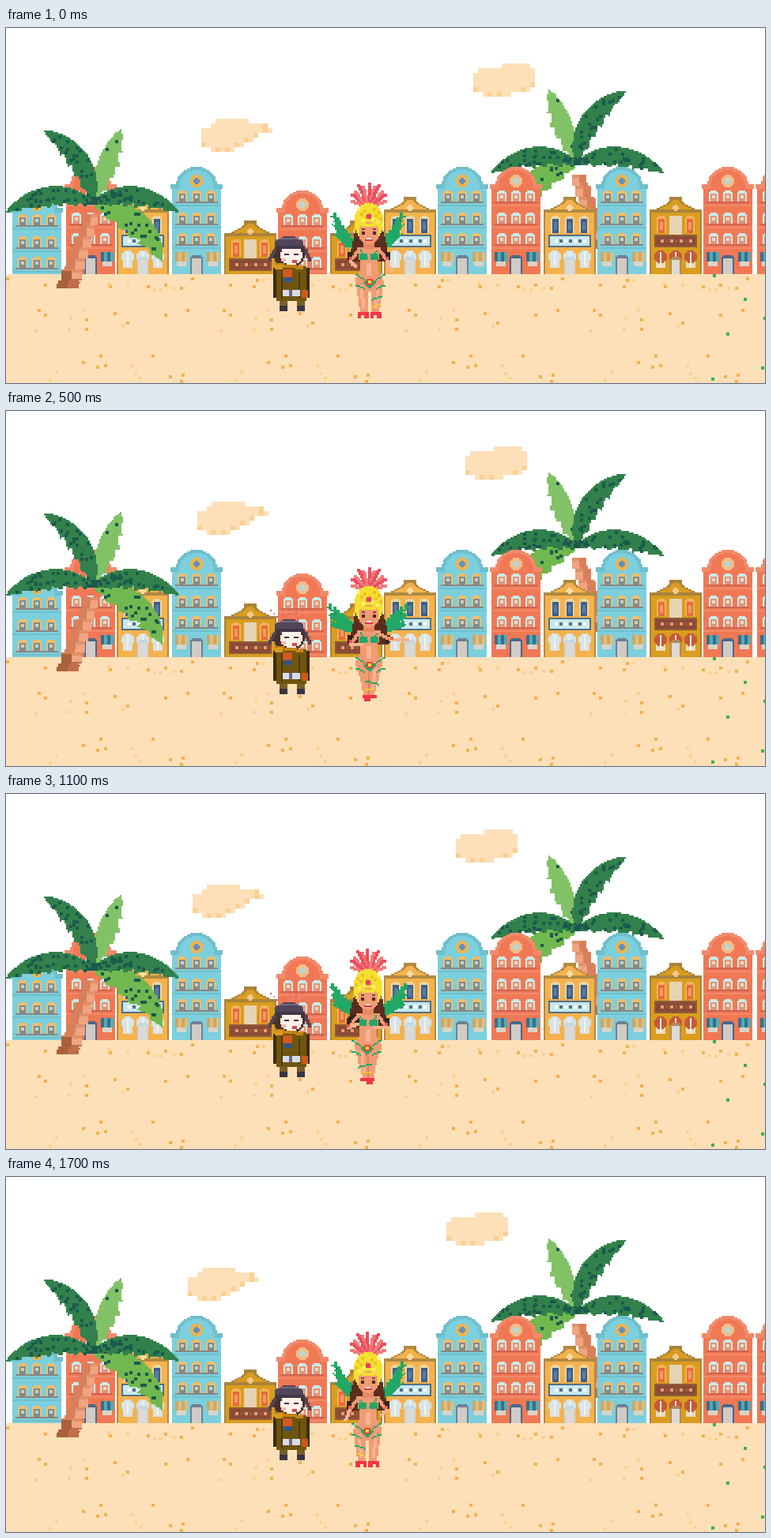
An HTML page with a canvas that plays this animation: 960 px wide and 450 px high, repeating every 1.8 s.

```html
<!DOCTYPE html>
<html lang="en">
<head>
<meta charset="utf-8">
<title>Carnival street</title>
<style>
html, body { margin: 0; width: 100%; height: 100%; overflow: hidden; background: #fff; }
canvas { display: block; }
</style>
</head>
<body>
<canvas id="stage" width="960" height="450"></canvas>
<script>
const stage = document.getElementById('stage').getContext('2d');
const backdrop = document.createElement('canvas');
backdrop.width = 960;
backdrop.height = 450;
let ctx = backdrop.getContext('2d');

let seed = 7;
const random = () => (seed = (seed * 16807) % 2147483647) / 2147483647;
const snap = v => Math.round(v / 2) * 2;

// Pixel-art primitives on a 2px grid
function px(x, y, w, h, color) {
  ctx.fillStyle = color;
  ctx.fillRect(x, y, w, h);
}

function poly(color, points) {
  const ys = points.map(p => p[1]);
  for (let y = snap(Math.min(...ys)); y < Math.max(...ys); y += 2) {
    const hits = [], sy = y + 1.01;
    points.forEach(([x1, y1], i) => {
      const [x2, y2] = points[(i + 1) % points.length];
      if ((y1 < sy) !== (y2 < sy)) hits.push(x1 + (sy - y1) / (y2 - y1) * (x2 - x1));
    });
    hits.sort((a, b) => a - b);
    for (let i = 0; i + 1 < hits.length; i += 2)
      px(snap(hits[i]), y, snap(hits[i + 1]) - snap(hits[i]), 2, color);
  }
}

function disc(cx, cy, rx, ry, color) {
  for (let y = -ry; y < ry; y += 2) {
    const half = snap(rx * Math.sqrt(1 - ((y + 1) / ry) ** 2));
    px(cx - half, cy + y, half * 2, 2, color);
  }
}

function line(x1, y1, x2, y2, w, color) {
  const n = Math.ceil(Math.max(Math.abs(x2 - x1), Math.abs(y2 - y1)) / 2) || 1;
  for (let i = 0; i <= n; i++)
    px(snap(x1 + (x2 - x1) * i / n - w / 2), snap(y1 + (y2 - y1) * i / n - w / 2), w, w, color);
}

function arch(x, y, w, h, frame, inner) {
  px(x + 2, y, w - 4, 2, frame);
  px(x, y + 2, w, h - 2, frame);
  px(x + 2, y + 4, w - 4, h - 4, inner);
}

// Buildings, 66px wide with their foot at y 312
function tall(c) {
  disc(33, 200, 26, 24, c.edge);
  px(0, 198, 66, 6, c.edge);
  px(2, 204, 62, 108, c.wall);
  disc(33, 202, 22, 22, c.wall);
  disc(33, 194, 8, 8, c.ring);
  disc(33, 194, 4, 4, c.gem);
  for (let y = 206; y < 270; y += 27) {
    for (let x = 9; x < 50; x += 18) {
      arch(x, snap(y), 12, 14, c.frame, c.pane);
      px(x + 4, snap(y) + 6, 4, 4, c.glow);
    }
    px(6, snap(y) + 14, 54, 2, c.ledge);
    px(2, snap(y) + 18, 62, 2, c.edge);
  }
  for (const x of [6, 46]) {
    px(x + 2, 294, 12, 8, '#d9d4c9');
    for (let i = 0; i < 4; i++) px(x + i * 4, 284, 4, 12, i % 2 ? c.awning : c.stripe);
  }
  arch(25, 288, 16, 24, c.door, '#d0cbc4');
}

function low(c) {
  for (let y = 214; y < 236; y += 2) {
    const half = snap(20 + 13 * Math.tanh((y - 226) / 5));
    px(33 - half, y, half * 2, 2, c.edge);
    if (y > 216) px(37 - half, y, half * 2 - 8, 2, c.wall);
  }
  px(0, 230, 66, 4, c.edge);
  px(0, 234, 66, 78, c.edge);
  px(2, 234, 62, 78, c.wall);
  disc(33, 228, 4, 4, c.gem);
  for (let x = 9; x < 50; x += 18) {
    arch(x, 238, 12, 22, c.frame, c.pane);
    px(x + 4, 246, 4, 10, c.glow);
  }
  if (c.hall) px(25, 238, 16, 24, c.hall);
  px(6, 262, 54, 16, c.trim);
  px(8, 264, 50, 12, c.sign);
  for (let x = 14; x < 52; x += 6) px(x, 268, 4, 4, x % 4 ? c.mark : c.trim);
  for (let x = 14; x < 54; x += 19) {
    px(x - 6, 290, 12, 14, c.shop);
    disc(x, 290, 8, 8, c.awning);
    px(x - 8, 290, 16, 2, c.awning);
    px(x - 1, 284, 2, 18, '#fff0dd');
  }
  arch(26, 290, 14, 22, c.door, '#ddd9d4');
}

const styles = {
  b: { draw: tall, wall: '#7ccfdd', edge: '#70bfcb', ring: '#f0b44c', gem: '#5f8fc0', frame: '#f4bd68',
    pane: '#7d8c92', glow: '#c6d0c4', ledge: '#8c8580', awning: '#e0bd78', stripe: '#c9a86b', door: '#708091' },
  c: { draw: tall, wall: '#f17855', edge: '#f18a6b', ring: '#f4bd88', gem: '#b5d9d6', frame: '#c9ecea',
    pane: '#e49478', glow: '#f6d9bf', ledge: '#cf624e', awning: '#49aeb8', stripe: '#436a86', door: '#49688b' },
  y: { draw: low, wall: '#f5b24c', edge: '#b18a42', gem: '#f6dda5', frame: '#e7d6a4', pane: '#3f5f8a',
    glow: '#5b7ca2', trim: '#547086', sign: '#c8e8ec', mark: '#fff', shop: '#dce2e5', awning: '#d5e5e9', door: '#c5d7e1' },
  g: { draw: low, wall: '#d99d1f', edge: '#a9833b', gem: '#f3c98b', frame: '#f2b25a', pane: '#e66b3c', hall: '#e6d3b4',
    glow: '#f09a62', trim: '#8e5c35', sign: '#8b4a38', mark: '#e79b70', shop: '#eadbc1', awning: '#c75838', door: '#b18b55' }
};

// Capital letters stand lower in the sand
function street(plan) {
  [...plan].forEach((letter, i) => {
    const style = styles[letter.toLowerCase()];
    ctx.save();
    ctx.translate(snap(6 + 67.3 * i), letter in styles ? 0 : 30);
    style.draw(style);
    ctx.restore();
  });
}

// A frond follows a quadratic curve; its outer side is notched
function frond(color, tx, ty, cx, cy, width, specks) {
  const at = (u, offset) => {
    const dx = 2 * (1 - u) * cx + 2 * u * (tx - cx), dy = 2 * (1 - u) * cy + 2 * u * (ty - cy);
    const k = offset / Math.hypot(dx, dy);
    return [2 * u * (1 - u) * cx + u * u * tx - dy * k, 2 * u * (1 - u) * cy + u * u * ty + dx * k];
  };
  const half = u => width * Math.sin(Math.PI * u ** .9) ** .7;
  const side = Math.sign(tx), inner = [], outer = [];
  for (let i = 0; i <= 40; i++) {
    const u = i / 40;
    inner.push(at(u, -side * half(u)));
    outer.unshift(at(u, side * half(u) * (1.1 - .5 * (u * 6 % 1))));
  }
  poly(color, [...inner, ...outer]);
  for (let i = 0; i < specks; i++) {
    const u = random() ** 1.5 * .9, [x, y] = at(u, (random() * 1.6 - .8) * half(u));
    px(snap(x - 2), snap(y - 2), 4, 4, '#1b5a4d');
  }
}

function palm(x, y, flip) {
  ctx.save();
  ctx.translate(x, y);
  ctx.scale(flip, 1);
  for (let row = 14; row < 108; row += 2) {
    const u = (row - 14) / 94, w = snap(18 + 10 * u), left = snap(-3 - 31 * u - w / 2 + row % 14 / 4);
    px(left, row, w, 2, u > .75 ? '#a9603c' : '#d8805a');
    px(left + w / 2, row, w / 2, 2, u > .86 ? '#bf6f4a' : row % 14 < 4 ? '#e0916b' : '#f0a480');
  }
  frond('#70b84f', 87, 74, 66, 19, 17, 24);
  frond('#82c267', 36, -94, 22, -57, 13, 2);
  frond('#32804b', -63, -92, -8, -64, 14, 26);
  frond('#32804b', -110, 12, -55, -22, 13, 32);
  frond('#32804b', 109, 12, 55, -22, 13, 32);
  ctx.restore();
}

function beach() {
  px(0, 312, 960, 138, '#fde0b7');
  for (let i = 0; i < 40; i++) {
    const band = [316, 354, 410][i % 3], depth = [14, 30, 36][i % 3];
    const x = snap(random() * 230), y = snap(band + random() * depth);
    for (let tile = 0; tile < 960; tile += 234) px(tile + x, y, 4, 4, i % 5 < 2 ? '#f8d28f' : '#f5b04c');
  }
  for (const [x, y] of [[894, 312], [933, 342], [911, 386], [958, 366], [955, 429], [892, 443]])
    px(x, y, 4, 4, '#3fae4e');
}

// Clouds are ellipses sampled on a 6px grid, shaded along the rim
function cloud(left, top, ellipses) {
  const inside = (c, r) => ellipses.some(([x, y, rx, ry]) =>
    ((c * 6 + 3 - x) / rx) ** 2 + ((r * 6 + 3 - y) / ry) ** 2 < 1);
  for (let r = 0; r < 7; r++)
    for (let c = 0; c < 15; c++) {
      if (!inside(c, r)) continue;
      const rim = !inside(c - 1, r) || !inside(c + 1, r) || !inside(c, r + 1);
      px(left + c * 6, top + r * 6, 6, 6, rim && (c * 3 + r) % 5 < 2 ? '#fbd093' : '#fde0b8');
    }
}

function traveller(k) {
  if (k > 1 && k < 13)
    for (let i = 0; i < 12; i++)
      px(334 + i * 4, (k < 5 ? 260 : 252) + i * 14 % 10, 2, 2, i % 2 ? '#e58a92' : '#b76b7c');
  for (const x of [346, 368]) {
    px(x, 344, 10, 8, '#75602a');
    px(x, 352, 10, 7, '#3a3443');
  }
  px(338, 304, 46, 38, '#3f2b13');
  px(342, 302, 38, 44, '#70550f');
  px(348, 306, 2, 38, '#4d3913');
  px(370, 310, 2, 32, '#4d3913');
  disc(358, 286, 20, 18, '#49312a');
  disc(358, 274, 18, 10, '#514658');
  px(346, 266, 24, 2, '#776a7c');
  for (const s of [-1, 1]) line(359 + s * 20, 282, 359 + s * 25, 294, 4, '#514658');
  disc(361, 288, 14, 12, '#fff0ea');
  px(342, 276, 36, 4, '#3f3748');
  px(348, 292, 6, 4, '#f6b8b0');
  px(352, 286, 6, 2, '#44343b');
  px(364, 286, 6, 2, '#44343b');
  px(362, 294, 6, 4, '#c84d52');
  line(344, 300, 374, 304, 4, '#c58417');
  px(340, 300, 10, 6, '#db9a20');
  px(350, 306, 12, 10, '#d15a1d');
  px(352, 316, 10, 6, '#2f5584');
  px(374, 332, 8, 10, '#cc5a18');
  px(350, 332, 22, 8, '#d8dce7');
  px(358, 332, 4, 8, '#6c6980');
}

const skin = '#f19b74', lightSkin = '#f8b38f', green = '#22a866', red = '#f13546', black = '#34231d';

function feather(x, y, tx, ty) {
  line(x, y, tx, ty, 2, '#168657');
  for (let u = .1; u < 1; u += .14) {
    const bx = x + (tx - x) * u, by = y + (ty - y) * u, reach = 9 * (1 - u * .6);
    line(bx, by, bx + Math.sign(tx - x) * reach, by - 2, 2, green);
    line(bx, by, bx, by - reach, 4, green);
  }
}

function head(lift) {
  for (let i = -5; i <= 5; i++)
    line(459, 228, 459 + Math.sin(i * .3) * 22, 228 + lift - Math.cos(i * .25) * (i % 2 ? 26 : 31), 4, i % 2 ? '#f37a78' : '#e94f60');
  disc(459, 246, 19, 24, '#f5df32');
  for (let i = 0; i < 13; i++)
    px(444 + i * 14 % 30, 228 + i * 6 % 20, 4, 4, i % 3 ? '#f0c120' : '#fff26b');
  px(456, 236, 6, 6, '#e83f68');
  disc(459, 260, 13, 14, skin);
  px(450, 248, 18, 4, '#f5df32');
  for (const x of [450, 464]) {
    px(x, 254, 4, 2, '#7b4a35');
    px(x, 258, 4, 4, '#4b2b27');
  }
  px(454, 268, 10, 2, '#d93848');
  px(456, 266, 6, 2, '#fff0e8');
}

// One half cycle takes nine steps, then repeats mirrored
function dancer(k) {
  const q = k % 9, apart = q % 8 === 0, folded = !apart && q < 4;
  const spread = apart ? 0 : Math.sin(q / 8 * Math.PI) ** 2;
  ctx.save();
  if (k > 8) {
    ctx.translate(917, 0);
    ctx.scale(-1, 1);
  }
  for (const s of [-1, 1])
    for (let i = 0; i < 3; i++)
      feather(458 + s * 18, 280, 458 + s * (44 - i * 2 + spread * 6), 238 + i * 12 + spread * 12);
  poly('#5a2d1d', [[444, 246], [474, 246], [482, 276], [484, 296], [434, 296], [438, 274]]);
  px(432, 284, 6, 10, black);
  px(480, 284, 6, 10, black);

  // Legs and shoes
  if (apart) {
    for (const s of [-1, 1]) {
      poly(skin, [[460, 320], [460 + s * 18, 320], [460 + s * 15, 340], [460 + s * 12, 360], [460 + s * 3, 360]]);
      line(460 + s * 11, 324, 460 + s * 8, 354, 4, lightSkin);
      px(453 + s * 8, 360, 14, 4, red);
      px(453 + s * 8, 364, 4, 4, red);
      px(461 + s * 8, 364, 6, 4, red);
    }
    line(462, 344, 474, 340, 2, green);
    line(462, 354, 472, 350, 2, '#f0d02d');
  } else {
    poly(skin, [[442, 318], [476, 318], [471, 342], [465, 360], [452, 360], [449, 344]]);
    line(460, 330, 458, 358, 2, '#dc815e');
    line(468, 322, 464, 350, 4, lightSkin);
    px(451, 360, 18, 4, red);
    px(453, 364, 8, 4, red);
    line(454, 342, 470, 346, 2, green);
    line(454, 352, 466, 354, 2, '#f0c62d');
  }

  // Body and costume
  poly(skin, [[444, 278], [474, 278], [469, 304], [477, 320], [474, 326], [444, 326], [441, 320], [449, 304]]);
  px(456, 298, 6, 16, lightSkin);
  px(452, 272, 14, 8, '#e58a65');
  for (const s of [-1, 1]) {
    px(454 + s * 7, 286, 10, 8, green);
    line(459 + s * 11, 280, 459 + s * 3, 290, 2, green);
    line(460 + s * 18, 312, 460, 324, 2, green);
    line(460 + s * 18, 326, 460 + s * 8, 330, 2, green);
  }
  poly(green, [[452, 322], [468, 322], [460, 332]]);
  px(456, 318, 8, 8, '#ef4435');
  px(458, 320, 4, 4, '#f8d93a');

  // The leading arm folds, swings out and sinks
  const hand = apart ? [487, 308] : folded ? [472, 292] : [508, 290 + (q - 5) * 6.5];
  const elbow = apart ? [482, 294] : folded ? [484, 296] : [488, 290];
  if (folded) disc(478, 288, 8, 8, black);
  line(446, 282, 435, 295, 4, skin);
  line(435, 295, apart ? 442 : 450, apart ? 302 : 296, 4, lightSkin);
  line(472, 282, ...elbow, 4, skin);
  line(...elbow, ...hand, 4, lightSkin);
  px(434, 290, 4, 4, '#ee5a55');
  px(elbow[0] - 2, elbow[1] - 4, 4, 4, '#ee5a55');
  head(spread > .5 ? 2 : 0);
  ctx.restore();
}

palm(722, 172, -1);
street('BcybGCGybcybgcc');
beach();
palm(110, 222, 1);
ctx = stage;

function frame() {
  const k = Math.floor(performance.now() / 100) % 18;
  px(0, 0, 960, 450, '#fff');
  ctx.drawImage(backdrop, 0, 0);
  cloud(247 - k, 115, [[39, 16, 32, 18], [27, 24, 28, 18], [75, 14, 18, 6]]);
  cloud(591 - 2 * k, 45, [[30, 23, 32, 20], [54, 18, 26, 19]]);
  traveller(k);
  dancer(k);
  requestAnimationFrame(frame);
}
frame();
</script>
</body>
</html>
```
